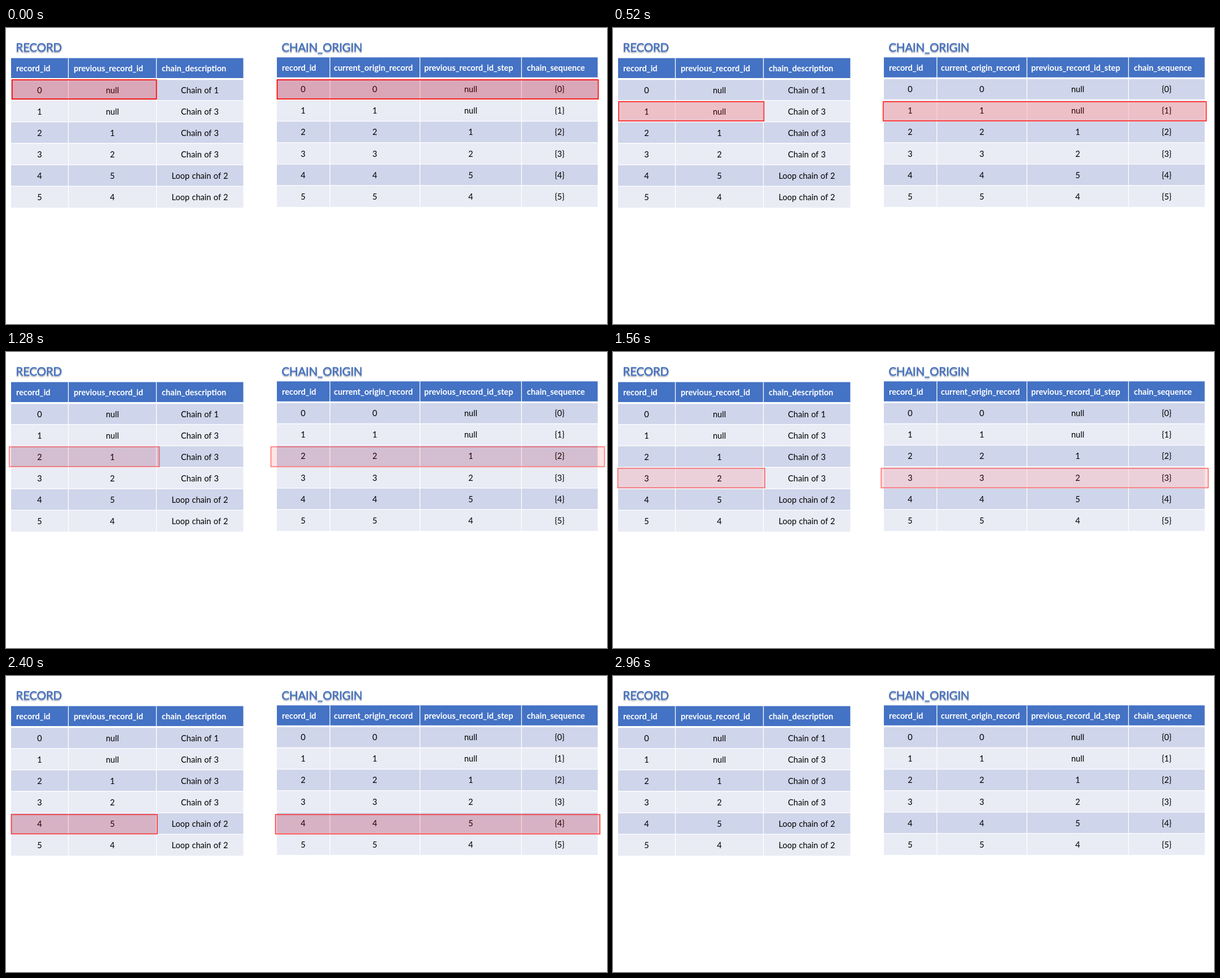
These frames come from a looping animation (1065x526 px, 6030 ms). An HTML page:

```html
<!DOCTYPE html>
<html lang="en">
<head>
<meta charset="utf-8">
<title>Record chains</title>
<style>
  html, body { margin: 0; width: 100%; height: 100%; overflow: hidden; background: #fff; }
  svg { display: block; width: 1065px; height: 526px; font: 14.6px Lato, sans-serif; }
  .title { font-size: 20.5px; letter-spacing: -.2px; fill: #4472c4; stroke: #4472c4; stroke-width: .45px;
           text-shadow: 0 1.5px 2px rgba(60, 70, 90, .4); }
  .head { font-weight: 700; fill: #fff; }
  .cell { text-anchor: middle; word-spacing: .6px; fill: #000; }
  .pulse { fill: #f00; fill-opacity: .215; stroke: #f00; stroke-width: 1.7px; }
</style>
</head>
<body>
<svg id="stage" viewBox="0 0 1065 526"></svg>
<script>
const stage = document.getElementById('stage');
const PITCH = 38.1;

const tables = [
  {
    title: 'RECORD', titleX: 17.5, top: 53.5, edges: [9, 110.5, 266.5, 420.5],
    heads: [['record_id', 18], ['previous_record_id', 120], ['chain_description', 276]],
    centers: [59.5, 188.5, 343.5],
    rows: ['0|null|Chain of 1', '1|null|Chain of 3', '2|1|Chain of 3',
           '3|2|Chain of 3', '4|5|Loop chain of 2', '5|4|Loop chain of 2']
  },
  {
    title: 'CHAIN_ORIGIN', titleX: 488.5, top: 52.2, edges: [480, 574, 733.5, 913.5, 1048.5],
    heads: [['record_id', 489], ['current_origin_record', 581],
            ['previous_record_id_step', 741], ['chain_sequence', 923]],
    centers: [526.5, 653.5, 823.5, 981],
    rows: ['0|0|null|{0}', '1|1|null|{1}', '2|2|1|{2}',
           '3|3|2|{3}', '4|4|5|{4}', '5|5|4|{5}']
  }
];

function add(tag, attrs, text) {
  const node = document.createElementNS('http://www.w3.org/2000/svg', tag);
  for (const name in attrs) node.setAttribute(name, attrs[name]);
  if (text) node.textContent = text;
  return stage.appendChild(node);
}

function drawTable({ title, titleX, top, edges, heads, centers, rows }) {
  const left = edges[0];
  const right = edges[edges.length - 1];
  const bodyTop = top + 37.2;
  const bottom = bodyTop + PITCH * rows.length;
  const band = (y, height, fill) => add('rect', { x: left, y, width: right - left, height, fill });
  const rule = (x1, y1, x2, y2, width) =>
    add('line', { x1, y1, x2, y2, stroke: '#fff', 'stroke-width': width });

  add('text', { class: 'title', x: titleX, y: 42 }, title);
  band(top, 37.2, '#4472c4');
  rows.forEach((_, i) => band(bodyTop + i * PITCH, PITCH, i % 2 ? '#e9ebf5' : '#cfd5ea'));
  rows.forEach((_, i) => {
    const y = bodyTop + i * PITCH;
    rule(left, y, right, y, i ? 1.3 : 3.2);
  });
  edges.slice(1, -1).forEach(x => rule(x, top, x, bottom, 1.3));

  heads.forEach(([label, x]) => add('text', { class: 'head', x, y: top + 23.7 }, label));
  rows.forEach((row, i) => row.split('|').forEach((label, c) =>
    add('text', { class: 'cell', x: centers[c], y: top + 62 + i * PITCH }, label)));
}

tables.forEach(drawTable);

const boxes = [{ x: 138.7, width: 255.8 }, { x: 765, width: 569 }]
  .map(box => ({ ...box, node: add('rect', { class: 'pulse', y: -17, height: 34, x: -box.width / 2, width: box.width }) }));
const rowCenters = [109.1, 148, 186.1, 224, 263.4, 301.6];

const LOOP = 6030;
const PULSE = 490;
const STEP = 40;

function render(time) {
  const t = Math.floor((time % LOOP) / STEP) * STEP;
  const row = Math.floor(t / PULSE);
  const phase = (t % PULSE) / PULSE;
  const fromEdge = Math.min(phase, 1 - phase);
  const scale = 1 + 0.1 * fromEdge;
  const opacity = row < rowCenters.length ? 1 - 0.5 * Math.min(1, fromEdge / 0.2) : 0;
  for (const { x, node } of boxes) {
    node.setAttribute('transform', `translate(${x} ${rowCenters[row] || 0}) scale(${scale})`);
    node.setAttribute('opacity', opacity);
  }
}

const start = performance.now();
function tick() {
  render(performance.now() - start);
  requestAnimationFrame(tick);
}
tick();
</script>
</body>
</html>
```
